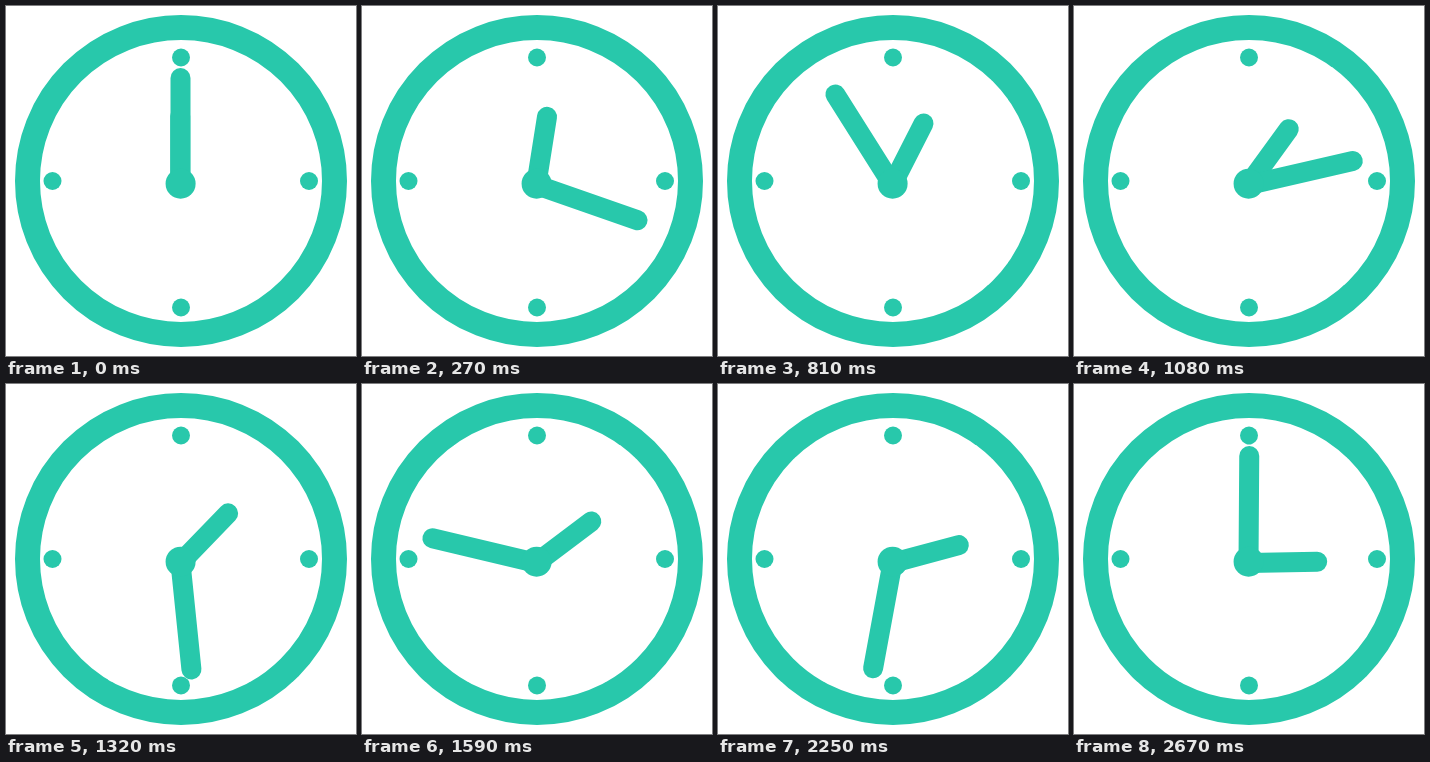
An HTML page that plays this animation: 350x350 px, repeating every 2.7 s.

```html
<!DOCTYPE html>
<html lang="en">
<head>
<meta charset="utf-8">
<title>Clock</title>
<style>
  html, body { margin: 0; width: 100%; height: 100%; overflow: hidden; background: #fff; }
  svg { display: block; width: 100vw; height: 100vh; }
  line { stroke: #28c8ab; stroke-width: 20; stroke-linecap: round; }
</style>
</head>
<body>
<svg viewBox="0 0 350 350" fill="#28c8ab">
  <circle cx="175" cy="175" r="153.5" fill="none" stroke="#28c8ab" stroke-width="25"/>
  <circle cx="175" cy="51.5" r="9"/>
  <circle cx="303" cy="175" r="9"/>
  <circle cx="175" cy="301.5" r="9"/>
  <circle cx="46.5" cy="175" r="9"/>
  <line id="hour" x1="174.2" y1="179" x2="174.2" y2="110"/>
  <line id="minute" x1="174.5" y1="179" x2="174.5" y2="72"/>
  <circle cx="174.6" cy="177.7" r="15"/>
</svg>
<script>
  const LOOP = 2700, STEP = 30, LAST = LOOP / STEP - 1;
  const hour = document.getElementById('hour');
  const minute = document.getElementById('minute');

  function turn(hand, angle) {
    const x = hand.getAttribute('x1'), y = hand.getAttribute('y1');
    hand.setAttribute('transform', `rotate(${angle} ${x} ${y})`);
  }

  function draw(ms) {
    const tick = Math.floor((ms % LOOP) / STEP);
    turn(hour, tick);
    turn(minute, tick * 1080.4 / LAST);
  }

  let start;
  function frame(now) {
    start ??= now;
    draw(Math.max(0, now - start));
    requestAnimationFrame(frame);
  }
  draw(0);
  requestAnimationFrame(frame);
</script>
</body>
</html>
```
